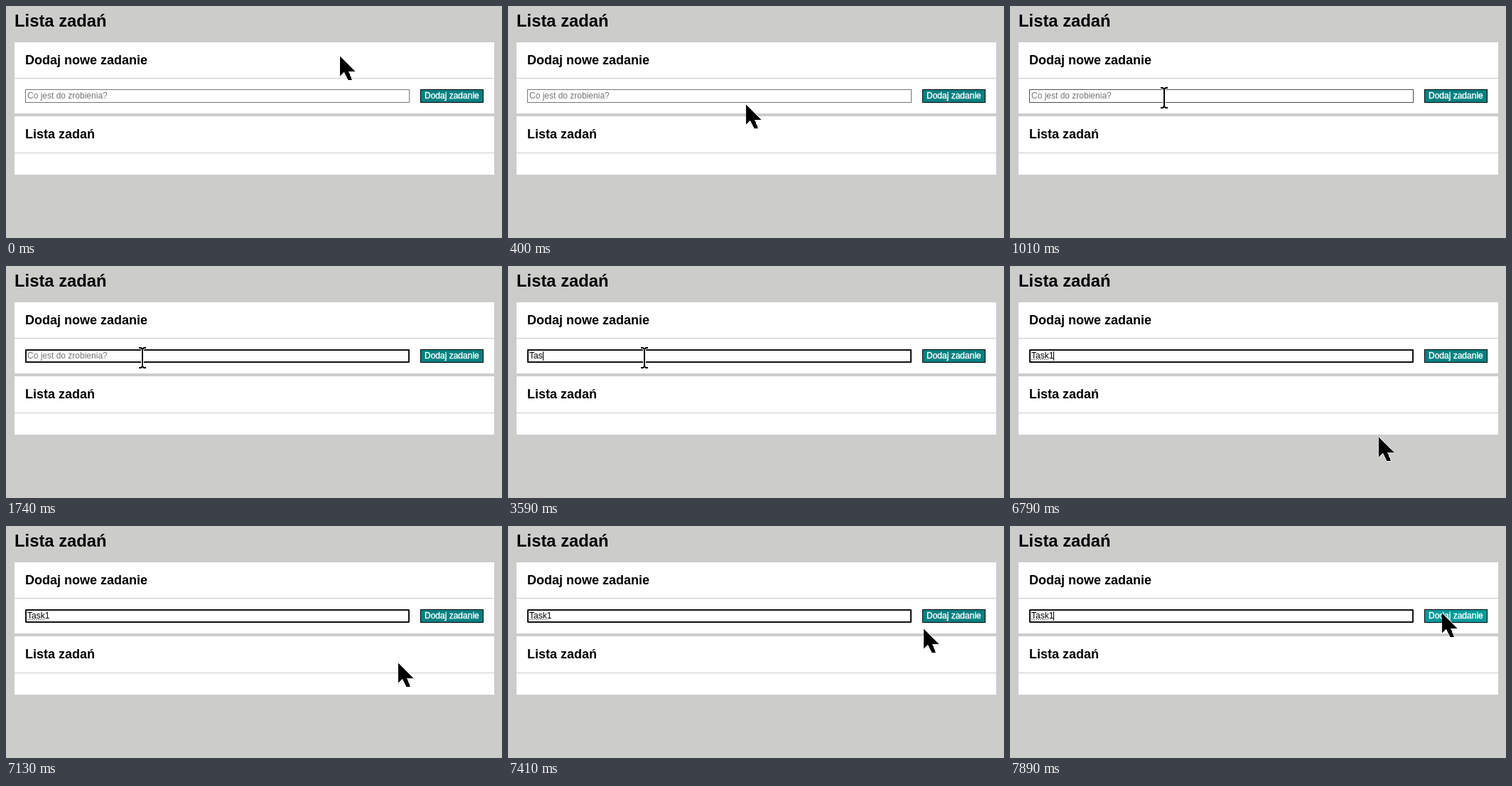
An HTML page that plays this animation: 698 by 326 pixels, repeating every 8000 ms.

```html
<!DOCTYPE html>
<html lang="pl">
<head>
<meta charset="utf-8">
<title>Lista zadań</title>
<style>
  html, body { margin: 0; width: 100%; height: 100%; overflow: hidden; background: #cccccb; }
  svg { display: block; font-family: "Liberation Sans", Arial, sans-serif; font-size: 12px; }
  .title { font-size: 23.8px; font-weight: bold; }
  .heading { font-size: 18px; font-weight: bold; }
</style>
</head>
<body>
<svg width="698" height="326" viewBox="0 0 698 326">
  <defs>
    <path id="beam-shape" d="M-5-14H-2L0-12L2-14H5M0-12V12M-5 14H-2L0 12L2 14H5"/>
  </defs>
  <rect width="698" height="326" fill="#cccccb"/>
  <text class="title" x="12" y="29">Lista zadań</text>

  <path d="M12 51H687V151H12ZM12 155H687V237H12Z" fill="#fff"/>
  <path d="M12 101.5H687M12 206.5H687" stroke="#ccc"/>
  <text class="heading" x="27" y="82">Dodaj nowe zadanie</text>
  <text class="heading" x="27" y="186">Lista zadań</text>

  <rect id="field" x="27.5" y="117.5" width="540" height="18" fill="#fff"/>
  <rect id="focus" x="28" y="118" width="539" height="17" rx="1" fill="#fff" stroke="#101010" stroke-width="2"/>
  <text id="placeholder" x="30" y="130" fill="#757575">Co jest do zrobienia?</text>
  <text id="value" x="30" y="130"></text>
  <path id="spelling" d="M30 131.5H55" stroke="#777" stroke-dasharray="2 1"/>
  <rect id="caret" y="120" width="1" height="13"/>

  <rect id="button" x="583.5" y="117.5" width="88" height="18" stroke="#000"/>
  <text x="589" y="130" fill="#fff" stroke="#fff" stroke-width="0.4">Dodaj zadanie</text>

  <path id="arrow" d="M0 0H.7L20.7 20.5H12L17 33H11.5L6 22L0 27.5Z"
        stroke="#fff" paint-order="stroke" shape-rendering="crispEdges"/>
  <g id="beam" fill="none">
    <use href="#beam-shape" stroke="#fff" stroke-width="4"/>
    <use href="#beam-shape" stroke="#000" stroke-width="2"/>
  </g>
</svg>
<script>
const LOOP = 8000;
const STEP = 70;
const BLINK = 530;
const TEXT = "Task1";
const FOCUS_AT = 1140;
const SPELLING_AT = 5530;
const KEY_TIMES = [2730, 3060, 3590, 3920, 4470];

const HOME = { x: 470, y: 71 };
const MOVES = [
  { start: 190, steps: 4, x: 335, y: 139 },
  { start: 470, steps: 3, x: 236, y: 139 },
  { start: 940, steps: 3, x: 210, y: 125 },
  { start: 1340, steps: 3, x: 192, y: 129 },
  { start: 6580, steps: 4, x: 519, y: 241 },
  { start: 6920, steps: 8, x: 585, y: 145 },
  { start: 7480, steps: 4, x: 608, y: 123 }
];

const el = id => document.getElementById(id);
const show = (id, on) => el(id).setAttribute("visibility", on ? "visible" : "hidden");
const set = (id, name, value) => el(id).setAttribute(name, value);
const smooth = p => p * p * (3 - 2 * p);
const inside = (x, y, left, right) => x >= left && x < right && y >= 117 && y < 136;

function pointerAt(t) {
  let { x, y } = HOME;
  for (const move of MOVES.filter(m => m.start <= t)) {
    const done = Math.floor((t - move.start) / STEP) + 1;
    const p = smooth(Math.min(1, done / move.steps));
    x += (move.x - x) * p;
    y += (move.y - y) * p;
  }
  return { x: Math.round(x), y: Math.round(y) };
}

function caretOn(t) {
  const reset = [FOCUS_AT, ...KEY_TIMES].filter(time => time <= t).pop();
  return reset !== undefined && Math.floor((t - reset) / BLINK) % 2 === 0;
}

function render(t) {
  const { x, y } = pointerAt(t);
  const overField = inside(x, y, 27, 568);
  const overButton = inside(x, y, 583, 672);
  const typed = KEY_TIMES.filter(time => time <= t).length;

  set("field", "stroke", overField ? "#4f4f4f" : "#767676");
  show("focus", t >= FOCUS_AT);
  show("placeholder", typed === 0);
  el("value").textContent = TEXT.slice(0, typed);
  show("spelling", t >= SPELLING_AT);
  set("caret", "x", 30 + Math.round(el("value").getComputedTextLength()));
  show("caret", caretOn(t));
  set("button", "fill", overButton ? "#009a9a" : "#008080");

  for (const id of ["arrow", "beam"]) set(id, "transform", `translate(${x} ${y})`);
  show("arrow", !overField);
  show("beam", overField);
}

const start = performance.now();
function tick() {
  render((performance.now() - start) % LOOP);
  requestAnimationFrame(tick);
}
tick();
</script>
</body>
</html>
```
